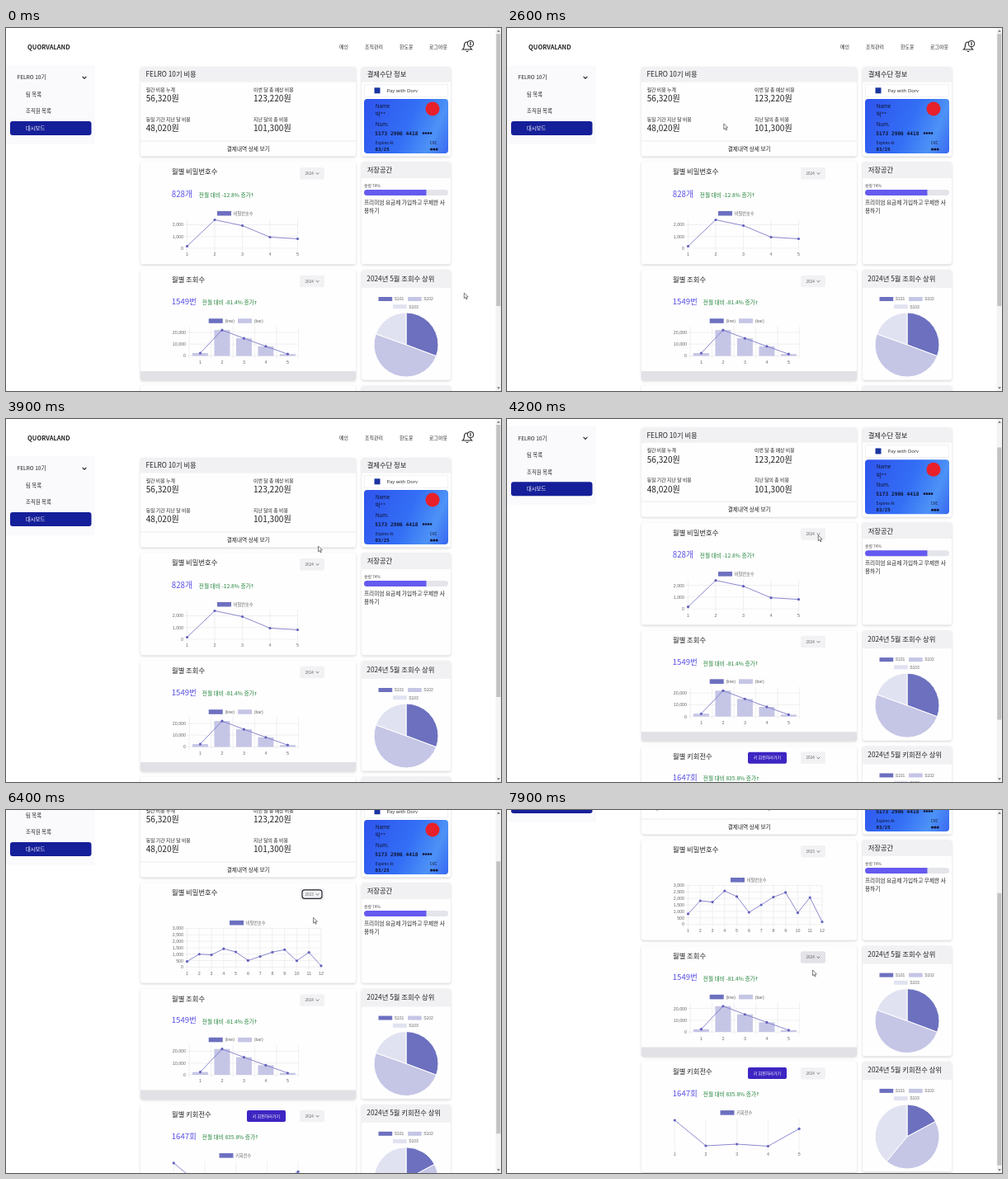
Recreate the animation shown at these times as an HTML page with a canvas. Size 600x440 px, loop 8 s.

```html
<!DOCTYPE html>
<html lang="ko">
<head>
<meta charset="utf-8">
<title>Dashboard</title>
<style>
html, body { margin: 0; width: 100%; height: 100%; overflow: hidden; background: #fff; }
canvas { display: block; width: 600px; height: 440px; }
</style>
</head>
<body>
<canvas id="stage"></canvas>
<script>
const LOOP = 8000;
const KR = '"Noto Sans CJK KR", "Noto Sans CJK JP", "Noto Sans", sans-serif';
const ARIAL = '"Liberation Sans", Arial, "Noto Sans CJK KR", sans-serif';
const MONO = '"DejaVu Sans Mono", "Noto Sans Mono", monospace';
const LATIN = '"Noto Sans", "Open Sans", sans-serif';
const DARK = '#6c70bf', MID = '#c5c5e6', PALE = '#e1e2f1';
const INK = '#222226', GREY = '#666', ACCENT = '#5a50e4', GREEN = '#23853c';

const cv = document.getElementById('stage');
const ctx = cv.getContext('2d');
const dpr = window.devicePixelRatio || 1;
cv.width = 600 * dpr;
cv.height = 440 * dpr;

// y is the optical middle of the line
function text(s, x, y, size, { color = INK, weight = 400, font = KR, align = 'left' } = {}) {
  ctx.font = `${weight} ${size}px ${font}`;
  ctx.fillStyle = color;
  ctx.textAlign = align;
  ctx.fillText(s, x, y + size * 0.37);
  return ctx.measureText(s).width;
}

function rect(x, y, w, h, fill, r = 0) {
  ctx.fillStyle = fill;
  ctx.beginPath();
  ctx.roundRect(x, y, w, h, r);
  ctx.fill();
}

function stroke(pts, color, width) {
  ctx.strokeStyle = color;
  ctx.lineWidth = width;
  ctx.beginPath();
  pts.forEach(([x, y]) => ctx.lineTo(x, y));
  ctx.stroke();
}

function dot(x, y, r, fill) {
  ctx.fillStyle = fill;
  ctx.beginPath();
  ctx.arc(x, y, r, 0, Math.PI * 2);
  ctx.fill();
}

function card(x, y, w, h, head = 0) {
  ctx.save();
  ctx.shadowColor = 'rgba(0,0,0,.16)';
  ctx.shadowBlur = 3 * dpr;
  ctx.shadowOffsetY = 1.2 * dpr;
  rect(x, y, w, h, '#fefefe', 3);
  ctx.restore();
  if (head) rect(x, y, w, head, '#f1f1f3', [3, 3, 0, 0]);
}

function chevron(x, y, r, color, width) {
  stroke([[x - r, y - r / 2], [x, y + r / 2], [x + r, y - r / 2]], color, width);
}

function select(y, year, hover, focus) {
  rect(356, y, 30, 14.5, hover ? '#e3e3e8' : '#f2f2f5', 2);
  text(year, 362.5, y + 7.3, 4.7, { color: GREY });
  chevron(377.5, y + 7.3, 1.8, '#555', 0.8);
  if (focus) {
    ctx.strokeStyle = '#25252b';
    ctx.lineWidth = 1.2;
    ctx.beginPath();
    ctx.roundRect(359, y + 2, 24, 10.5, 3);
    ctx.stroke();
  }
}

function delta(s, x, y) {
  const end = x + text(s, x, y, 6.7, { color: GREEN }) + 1.8;
  stroke([[end, y + 2], [end, y - 2]], GREEN, 0.6);
  stroke([[end - 1.2, y - 0.8], [end, y - 2.1], [end + 1.2, y - 0.8]], GREEN, 0.6);
}

function legend(x, y, label, fill, size = 5.2) {
  rect(x, y - 2.8, 17, 5.6, fill);
  text(label, x + 19.7, y, size, { color: GREY, font: ARIAL });
}

function grid(xs, ys, x0, x1, y0, y1) {
  xs.forEach(x => stroke([[x, y0], [x, y1]], '#e6e6ea', 0.6));
  ys.forEach(y => stroke([[x0, y], [x1, y]], '#e6e6ea', 0.6));
}

function series(pts) {
  stroke(pts, '#7f7cc8', 0.9);
  pts.forEach(([x, y]) => dot(x, y, 1.6, '#6261bd'));
}

const axis = { color: GREY, font: ARIAL };
function yLabels(labels, x, y, step) {
  labels.forEach((s, i) => text(s, x, y - i * step, 5.3, { ...axis, align: 'right' }));
}
function xLabels(xs, y) {
  xs.forEach((x, i) => text(i + 1, x, y, 5.3, { ...axis, align: 'center' }));
}
const spread = (n, x0, step) => Array.from({ length: n }, (_, i) => x0 + i * step);

function header() {
  text('QUORVALAND', 26, 23, 7.5, { weight: 700 });
  [['메인', 404], ['조직관리', 435], ['한도윤', 477], ['로그아웃', 513]]
    .forEach(([s, x]) => text(s, x, 23, 5.95, { weight: 500 }));
  ctx.strokeStyle = '#222';
  ctx.lineWidth = 1.1;
  ctx.beginPath();
  ctx.moveTo(553.5, 26);
  ctx.quadraticCurveTo(555.5, 24.5, 555.5, 21);
  ctx.quadraticCurveTo(555.5, 17, 559, 17);
  ctx.quadraticCurveTo(562.5, 17, 562.5, 21);
  ctx.quadraticCurveTo(562.5, 24.5, 564.5, 26);
  ctx.closePath();
  ctx.stroke();
  stroke([[557.5, 27.8], [559, 28.8], [560.5, 27.8]], '#222', 1);
  dot(563, 19, 4, '#222');
  dot(563, 19, 3.1, '#fff');
  text('0', 563, 19, 4.5, { align: 'center', weight: 700, font: ARIAL });
}

function sidebar() {
  rect(0, 45, 108, 96, '#fafafc', 3);
  text('FELRO 10기', 13.5, 60, 6.6, { weight: 500 });
  chevron(95, 60, 2.4, '#222', 1.1);
  text('팀 목록', 24, 80.5, 6.4);
  text('조직원 목록', 24, 101, 6.4);
  rect(5, 113, 98.5, 17, '#151f99', 3);
  text('대시보드', 24, 121.4, 6.3, { color: '#fff', weight: 500 });
}

function costs() {
  card(163, 47, 261, 108.5, 18.5);
  text('FELRO 10기 비용', 169.5, 56.3, 8.3);
  [['월간 비용 누계', '56,320원', 169.7, 74.5], ['이번 달 총 예상 비용', '123,220원', 300, 74.5],
   ['동일 기간 지난 달 비용', '48,020원', 169.7, 110.5], ['지난 달의 총 비용', '101,300원', 300, 110.5]]
    .forEach(([label, sum, x, y]) => {
      text(label, x, y, 5.9, { weight: 500 });
      text(sum, x, y + 11.2, 10.1);
    });
  stroke([[163, 137], [424, 137]], '#e3e3e6', 0.7);
  text('결제내역 상세 보기', 293.7, 146.4, 6.66, { align: 'center' });
}

function payment() {
  card(431, 47, 108, 108.5, 18.5);
  text('결제수단 정보', 437.7, 56.3, 8.3);
  rect(434, 68, 102, 15.5, '#e6e6ea', 2);
  rect(434.5, 68.5, 101, 14.5, '#fff', 2);
  rect(446.5, 72.3, 7, 7, '#1a34a0');
  text('Pay with Dorv', 461.5, 76, 5.8, { color: '#333', font: LATIN });

  const g = ctx.createLinearGradient(434, 100, 536, 146);
  g.addColorStop(0, '#2f56ee');
  g.addColorStop(0.5, '#336ff5');
  g.addColorStop(0.8, '#4d92f6');
  g.addColorStop(1, '#3b6cf2');
  rect(434, 86, 102, 66, g, 4);
  dot(517, 98, 8.5, '#e8202a');
  const ink = { color: '#10142e', font: LATIN };
  const mono = { color: '#10142e', font: MONO, weight: 700 };
  text('Name', 447.8, 95, 6.2, ink);
  text('박**', 447.8, 105, 6.6, { color: '#10142e' });
  text('Num.', 447.8, 117, 6.2, ink);
  text('5173 2906 4418', 447.3, 127.5, 6.2, mono);
  spread(4, 506, 3).forEach(x => dot(x, 127.5, 1.3, '#10142e'));
  text('Expires At', 447.8, 139, 4.7, ink);
  text('CVC', 513.7, 139, 4.7, ink);
  text('03/25', 447.5, 147, 5.7, mono);
  spread(3, 515.5, 3.3).forEach(x => dot(x, 147, 1.5, '#10142e'));
}

const MONTHS = [800, 1820, 1720, 2580, 2140, 925, 1500, 2100, 2460, 890, 2070, 190];

function passwords(t, s) {
  card(163, 162, 261, s.old ? 124.3 : 121.8);
  text('월별 비밀번호수', 201, 174.3, 8.3);
  select(169, s.old ? '2024' : '2023', s.hover1, s.focus);
  if (s.old) {
    text('828개', 200.8, 201, 9.7, { color: ACCENT });
    delta('전월 대비 -12.8% 증가', 233.8, 202.3);
    legend(256, 224.7, '비밀번호수', DARK);
    const xs = spread(5, 219.5, 33.5);
    grid(xs, [238.5, 252.7, 267], 216.5, 354, 231.5, 270);
    yLabels(['0', '1,000', '2,000'], 215, 267, 14.25);
    xLabels(xs, 274.5);
    const ys = [264.5, 232.5, 239.5, 253.5, 255.5];
    series(xs.map((x, i) => [x, ys[i]]));
  } else {
    const grow = 1 - Math.pow(1 - Math.min(1, (t - s.swap) / 1000), 4);
    legend(271, 210.8, '비밀번호수', DARK);
    const xs = spread(12, 219.5, 14.77);
    grid(xs, spread(7, 217.5, 7.83), 216.5, 382, 217.5, 267.5);
    yLabels(['0', '500', '1,000', '1,500', '2,000', '2,500', '3,000'], 215, 264.5, 7.83);
    xLabels(xs, 272);
    series(xs.map((x, i) => [x, 264.5 - MONTHS[i] * grow * 0.01567]));
  }
}

function storage(s) {
  card(431, 162, 108, s.old ? 124.3 : 121.8, 20);
  text('저장공간', 437.7, 172.3, 8.3);
  text('용량 74%', 434, 191.5, 4.9, { color: '#555' });
  rect(434, 196, 102, 7, '#e4e5ea', 3.5);
  rect(434, 196, 75.5, 7, '#655af0', [3.5, 0, 0, 3.5]);
  text('프리미엄 요금제 가입하고 무제한 사', 434, 211.5, 6.66);
  text('용하기', 434, 221.5, 6.66);
}

function views(s) {
  card(163, 293, 261, 134);
  rect(163, 416, 261, 11.3, '#e1e1e6', [0, 0, 3, 3]);
  text('월별 조회수', 201, 305, 8.3);
  select(299.7, '2024', s.hover2);
  text('1549번', 200.8, 331, 9.6, { color: ACCENT });
  delta('전월 대비 -81.4% 증가', 237.8, 333);
  legend(245.7, 355, '(line)', DARK);
  legend(281, 355, '(bar)', MID);
  const xs = spread(5, 235.4, 26.5);
  grid(spread(6, 222.1, 26.5), [369, 383.2, 397.5], 219.5, 354.6, 361.5, 400.5);
  yLabels(['0', '10,000', '20,000'], 218, 397.5, 14.25);
  xLabels(xs, 405);
  const pts = [2400, 22000, 15000, 8200, 1600].map((v, i) => [xs[i], 397.5 - v * 0.001425]);
  pts.forEach(([x, y]) => rect(x - 9.5, y, 19, 397.5 - y, MID));
  series(pts);
}

function keys() {
  card(163, 433.3, 261, 134);
  text('월별 키회전수', 201, 445.7, 8.3);
  rect(292, 440.5, 47, 14, '#3c25c2', 2);
  text('키 회전하러가기', 315.5, 447.5, 5, { color: '#fff', weight: 500, align: 'center' });
  select(440.3, '2024');
  text('1647회', 200.8, 471.8, 9.6, { color: ACCENT });
  delta('전월 대비 835.8% 증가', 237.8, 472.8);
  legend(258.5, 495.3, '키회전수', DARK);
  const xs = spread(5, 203.3, 37.7);
  grid(xs, [], 0, 0, 502.5, 541.5);
  xLabels(xs, 545.5);
  const ys = [504.4, 535.4, 533.4, 535.9, 514.8];
  series(xs.map((x, i) => [x, ys[i]]));
}

function pie(y, title, cuts) {
  card(431, y, 108, 133.7, 22);
  text(title, 437.3, y + 10.5, 8.3);
  const names = [[451.5, 35.5, 'S101', DARK], [487, 35.5, 'S102', MID], [469, 44.7, 'S103', PALE]];
  names.forEach(([x, dy, s, c]) => {
    rect(x, y + dy - 2.5, 16.7, 5, c);
    text(s, x + 19.2, y + dy, 5, axis);
  });
  const cx = 485, cy = y + 91;
  let from = 0;
  [...cuts, 1].forEach((to, i) => {
    const a = f => (f * 2 - 0.5) * Math.PI;
    ctx.beginPath();
    ctx.moveTo(cx, cy);
    ctx.arc(cx, cy, 39, a(from), a(to));
    ctx.closePath();
    ctx.fillStyle = names[i][3];
    ctx.fill();
    ctx.strokeStyle = '#fff';
    ctx.lineWidth = 1;
    ctx.stroke();
    from = to;
  });
}

function triangle(y, dir) {
  ctx.fillStyle = '#777';
  ctx.beginPath();
  ctx.moveTo(595, y + dir);
  ctx.lineTo(597, y - dir);
  ctx.lineTo(599, y + dir);
  ctx.fill();
}

function scrollbar(y) {
  rect(593.5, 0, 6.5, 440, '#f3f3f3');
  triangle(3.5, 1.2);
  triangle(436.5, -1.2);
  rect(594.3, 7 + y * 0.745, 5, 330, '#c2c2c2');
}

function pointer(x, y) {
  ctx.beginPath();
  [[0, 0], [0, 6.8], [1.6, 5.4], [2.7, 7.9], [3.8, 7.4], [2.7, 5], [4.8, 4.8]]
    .forEach(([dx, dy]) => ctx.lineTo(x + dx, y + dy));
  ctx.closePath();
  ctx.fillStyle = '#fff';
  ctx.fill();
  ctx.strokeStyle = '#444';
  ctx.lineWidth = 0.7;
  ctx.stroke();
}

const PATH = [[0, 555.3, 321], [100, 555.3, 321], [500, 515, 240], [900, 452, 158],
  [1400, 270, 82], [1850, 195, 128], [2600, 262.8, 116], [3100, 299.8, 113.5],
  [3900, 378.5, 154], [4500, 376, 128], [5250, 370, 107], [5600, 370, 107],
  [6150, 373, 124], [6700, 372, 138.5], [7250, 372, 150], [7650, 371, 180], [7900, 370.5, 194], [8000, 370.5, 194]];

function cursorAt(t) {
  const i = PATH.findIndex((p, k) => k && t <= p[0]);
  const [t0, x0, y0] = PATH[i - 1], [t1, x1, y1] = PATH[i];
  const u = (t - t0) / (t1 - t0), e = u * u * (3 - 2 * u);
  return [x0 + (x1 - x0) * e, y0 + (y1 - y0) * e];
}

// start, length, distance of each wheel movement
const WHEEL = [[2660, 420, 70.2], [3560, 320, -70.2], [4120, 370, 70.4], [6390, 490, 55.6]];
const scrollAt = t => WHEEL.reduce((sum, [at, len, by]) => {
  const u = Math.min(1, Math.max(0, (t - at) / len));
  return sum + by * (1 - Math.pow(1 - u, 3));
}, 0);

function draw(t) {
  const swap = 6220;
  const s = {
    swap,
    old: t < swap,
    focus: t >= 5300 && t < 7400,
    hover1: t >= 5050 && t < 6300,
    hover2: t >= 7600
  };
  const y = scrollAt(t);
  ctx.setTransform(dpr, 0, 0, dpr, 0, 0);
  rect(0, 0, 600, 440, '#fff');
  ctx.translate(0, -y);
  header();
  sidebar();
  costs();
  payment();
  passwords(t, s);
  storage(s);
  if (!s.old) ctx.translate(0, -2.4);
  views(s);
  pie(293, '2024년 5월 조회수 상위', [0.307, 0.805]);
  keys();
  pie(433.3, '2024년 5월 키회전수 상위', [0.172, 0.61]);
  ctx.setTransform(dpr, 0, 0, dpr, 0, 0);
  scrollbar(y);
  pointer(...cursorAt(t));
}

const start = performance.now();
function frame(now) {
  draw(Math.max(0, now - start) % LOOP);
  requestAnimationFrame(frame);
}
draw(0);
requestAnimationFrame(frame);
</script>
</body>
</html>
```
